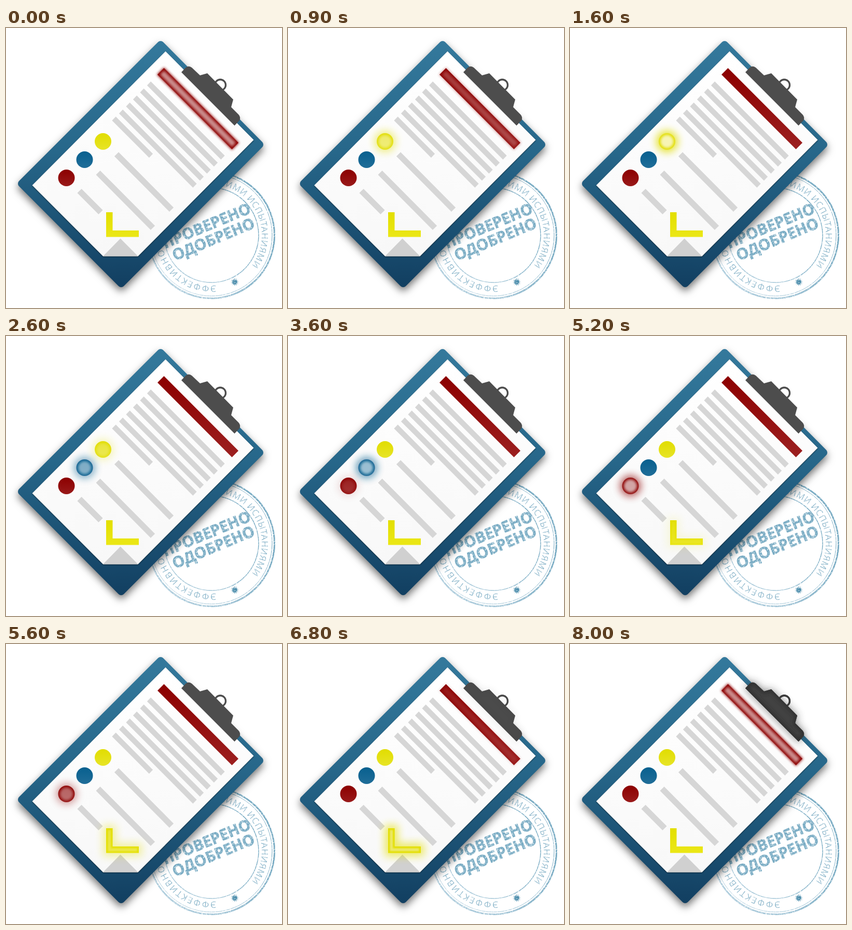
Recreate the animation shown at these times as an HTML page. Size 532x538 px, loop 8100 ms.

```html
<!DOCTYPE html>
<html lang="ru">
<head>
<meta charset="utf-8">
<title>Clipboard</title>
<style>
html, body { margin: 0; width: 100%; height: 100%; overflow: hidden; background: #fff; }
svg { display: block; width: 532px; height: 538px; }
text { font-family: "Open Sans", "Noto Sans", sans-serif; }
.board { filter: drop-shadow(0 7px 7.5px rgba(0,0,0,.55)); }
.paper { filter: drop-shadow(0 1.5px 1px rgba(0,0,0,.55)); }
</style>
</head>
<body>
<svg viewBox="0 0 532 538">
  <defs>
    <linearGradient id="blue" gradientUnits="userSpaceOnUse" x1="0" y1="25" x2="0" y2="498">
      <stop stop-color="#34799c"/><stop offset=".45" stop-color="#27678a"/><stop offset="1" stop-color="#123f61"/>
    </linearGradient>
    <linearGradient id="white" x2="0" y2="1">
      <stop stop-color="#fff"/><stop offset="1" stop-color="#f8f8f8"/>
    </linearGradient>
    <linearGradient id="ink" gradientUnits="userSpaceOnUse" x1="300" y1="500" x2="480" y2="370">
      <stop stop-color="#b3d0df"/><stop offset=".5" stop-color="#92bbcf"/><stop offset="1" stop-color="#72a7c0"/>
    </linearGradient>
    <filter id="worn" filterUnits="userSpaceOnUse" x="265" y="265" width="267" height="267">
      <feTurbulence type="fractalNoise" baseFrequency=".35" numOctaves="2" seed="4"/>
      <feColorMatrix values="0 0 0 0 0  0 0 0 0 0  0 0 0 0 0  2.2 0 0 0 -.2"/>
      <feComposite in="SourceGraphic" operator="in"/>
    </filter>
    <path id="ring" d="M396 495A97 97 0 0 1 396 301A97 97 0 0 1 396 495"/>
    <path id="ringTop" d="M299 398A97 97 0 0 1 493 398A97 97 0 0 1 396 495"/>
  </defs>

  <g filter="url(#worn)" fill="none" stroke="url(#ink)">
    <circle cx="396" cy="398" r="121.5" stroke-width="3"/>
    <circle cx="396" cy="398" r="117" stroke-width="1"/>
    <circle cx="396" cy="398" r="91" stroke-width="1.5"/>
    <g fill="#8bb6cb" stroke="none" font-size="17">
      <text transform="rotate(-5 396 398)" letter-spacing="1.8"><textPath href="#ring">ЭФФЕКТИВНОСТЬ</textPath></text>
      <text transform="rotate(37 396 398)" letter-spacing=".6" text-anchor="end"><textPath href="#ringTop" startOffset="304.7">СКИМИ ИСПЫТАНИЯМИ</textPath></text>
    </g>
    <g transform="translate(400 406) rotate(-22.5)" fill="#78abc3" stroke="#78abc3" stroke-width=".8" font-size="29.5" font-weight="bold" text-anchor="middle">
      <text x="-2.6" y="-19">ПРОВЕРЕНО</text>
      <text y="10">ОДОБРЕНО</text>
    </g>
    <path id="star" fill="#4a8cab" stroke="none"/>
  </g>

  <path class="board" d="M298 32L489 224L222 491L30 299Z" fill="url(#blue)" stroke="url(#blue)" stroke-width="14" stroke-linejoin="round"/>
  <path class="paper" d="M307.5 44.7L477.5 215L254.5 438.6H187L50.5 302.3Z" fill="url(#white)"/>
  <path d="M187 438.6L220.5 404.5L254.5 438.6Z" fill="#d0d0d0"/>
  <path id="lines" stroke="#d6d6d6" stroke-width="10.3"/>
  <path d="M213 242.5L319 349M177.5 278L283 384M141.5 313L182.5 354" stroke="#d6d6d6" stroke-width="11.5"/>
  <g id="items"></g>
</svg>
<script>
const $ = id => document.getElementById(id);
const disc = (x, y) => `M${x - 16} ${y}a16 16 0 1 1 32 0a16 16 0 1 1 -32 0Z`;

// Twelve-pointed star and the text block's ruled lines
$('star').setAttribute('d', 'M' + Array.from({length: 24}, (_, i) => {
  const r = i % 2 ? 4 : 8, a = i * Math.PI / 12;
  return `${441 + r * Math.cos(a)} ${488 + r * Math.sin(a)}`;
}).join('L') + 'Z');
$('lines').setAttribute('d', Array.from({length: 6}, (_, i) => {
  const len = i < 5 ? 142.5 : 71.5;
  return `M${275.5 - 13.5 * i} ${106.5 + 13.5 * i}l${len} ${len}`;
}).join(''));

// Pulse order; spread is the outer blur, rim the inner one
const items = [
  {d: 'M304.5 77L448 220.5L435.5 233L292 89.5Z', from: '#8c0000', to: '#9c2020', core: '#cb8c8c', spread: 2.5, rim: 2.8, grow: 2},
  {d: disc(187, 218), from: '#e1dd00', to: '#e7e427', core: '#f7f4b4', spread: 8, rim: 2.5, grow: 9},
  {d: disc(151.5, 253), from: '#08608f', to: '#206d98', core: '#b4d0df', spread: 8, rim: 2.5, grow: 7},
  {d: disc(116.5, 288), from: '#8c0000', to: '#991a1a', core: '#dfc2c2', spread: 8, rim: 2.5, grow: 7},
  {d: 'M193 354H205.5V389H256V401.6H193Z', from: '#e3df00', to: '#ebe717', core: '#eeea80', spread: 8, rim: 1.8, grow: 13, haze: .7},
  {d: 'M338 85L346 76.5Q351 71.5 358 76L374 91L388 87L438 137.5L434 152L448.5 166.5Q453 172 450 177.5L440.5 187.5Z',
   from: '#4d4d4d', to: '#4d4d4d', core: '#424242', edge: '#2b2b2b', spread: 8, rim: 4, grow: 2, haze: .5}
];

const blur = (id, s) => `<filter id="${id}" filterUnits="userSpaceOnUse" x="0" y="0" width="532" height="538"><feGaussianBlur stdDeviation="${s}"/></filter>`;
const handle = color => `<circle cx="413" cy="109.5" r="10.5" fill="none" stroke="${color}" stroke-width="3.3"/>`;

$('items').innerHTML = items.map((o, i) => {
  const edge = o.edge || o.from, clip = i === 5;
  return `<defs>${blur('out' + i, o.spread)}${blur('in' + i, o.rim)}
    <clipPath id="cut${i}"><path d="${o.d}"/></clipPath>
    <linearGradient id="fill${i}" x2="0" y2="1"><stop stop-color="${o.from}"/><stop offset="1" stop-color="${o.to}"/></linearGradient></defs>
    ${clip ? handle('#4d4d4d') : ''}
    <path d="${o.d}" fill="url(#fill${i})"/>
    <g id="glow${i}">
      <path d="${o.d}" fill="${edge}" stroke="${edge}" stroke-width="${o.grow}" opacity="${o.haze || .85}" filter="url(#out${i})"/>
      ${clip ? handle('#3a3a3a') : ''}
      <path d="${o.d}" fill="${o.core}"/>
      <g clip-path="url(#cut${i})"><path d="${o.d}" fill="none" stroke="${edge}" stroke-width="7" filter="url(#in${i})"/></g>
    </g>`;
}).join('');
const glows = items.map((_, i) => $('glow' + i));

// Neighbouring pulses cross-fade; the last one brings back the bar along with the clip
function draw(now) {
  const p = Math.floor(now % 8100 / 100) / 16;
  const pulse = i => {
    const k = Math.max(0, 1 - Math.abs(p - i));
    return k * k * (3 - 2 * k);
  };
  glows.forEach((g, i) => g.setAttribute('opacity', i ? pulse(i) : Math.max(pulse(0), pulse(5))));
}
const start = performance.now();
function tick() {
  draw(performance.now() - start);
  requestAnimationFrame(tick);
}
tick();
</script>
</body>
</html>
```
